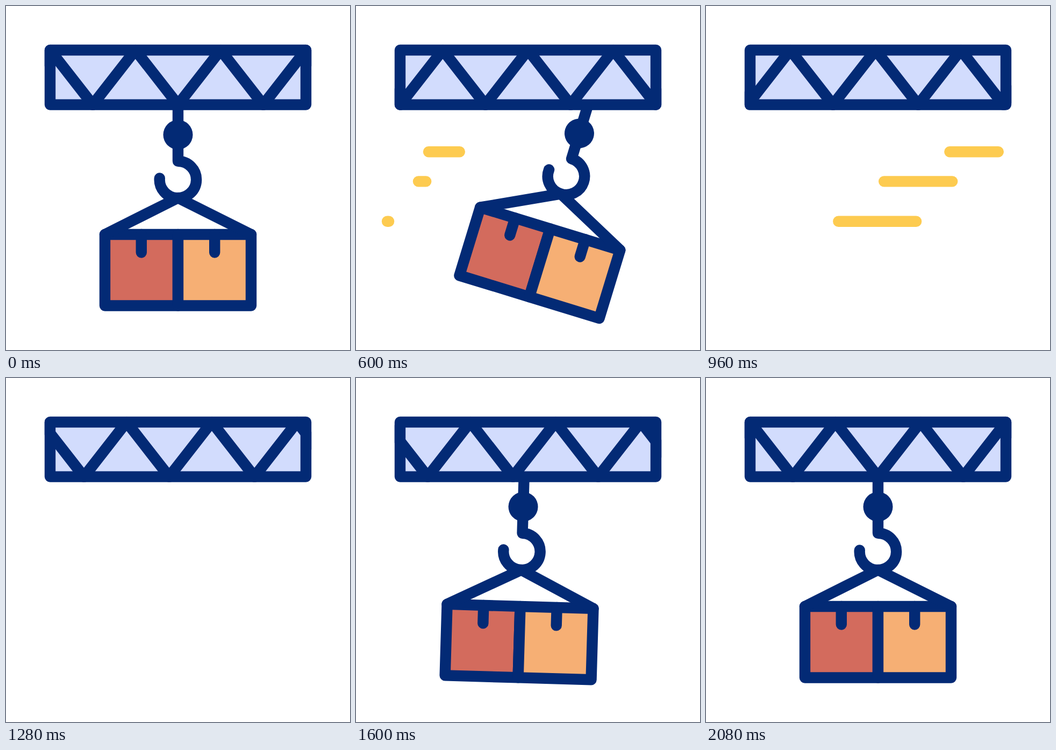
Recreate the animation shown at these times as an HTML page. Size 640x640 px, loop 3 s.

```html
<!DOCTYPE html>
<html lang="en">
<head>
<meta charset="utf-8">
<title>Crane</title>
<style>
  html, body { margin: 0; width: 100%; height: 100%; overflow: hidden; background: #fff; }
  svg { display: block; width: 100vw; height: 100vh; }
  .ink { stroke: #032a75; }
  .speed { stroke: #fdcb50; }
</style>
</head>
<body>
<svg viewBox="0 0 640 640" fill="none" stroke-width="20.4" stroke-linecap="round" stroke-linejoin="round">
  <clipPath id="beam"><rect x="71.8" y="71.8" width="496.4" height="122.4" rx="10"/></clipPath>
  <g id="lines" class="speed"></g>
  <g id="load" class="ink">
    <path d="M184 425H320V557.5H184Z" fill="#d36b5d"/>
    <path d="M320 425H456V557.5H320Z" fill="#f6af74"/>
    <path d="M251.8 425V458.5M388.2 425V458.5"/>
    <path d="M184 425L320 357L456 425"/>
    <path d="M320 183V288.8A34.2 34.2 0 1 1 285.8 320.5"/>
    <circle cx="320" cy="239.5" r="27.5" fill="#032a75" stroke="none"/>
  </g>
  <rect x="82" y="82" width="476" height="101.6" fill="#d2dcfd"/>
  <g clip-path="url(#beam)"><path id="truss" class="ink"/></g>
  <rect class="ink" x="82" y="82" width="476" height="101.6"/>
</svg>
<script>
const LOOP = 3000, STEP = 40;
const BAY = 158.6;      // width of one truss bay
const RUN = 480;        // travel of a speed line
const PIVOT = 183;
const $ = id => document.getElementById(id);
const clamp = v => Math.min(1, Math.max(0, v));

// Smooth curve through [time, value] points that never overshoots.
function curve(pts) {
  const slope = pts.slice(1).map((p, i) => (p[1] - pts[i][1]) / (p[0] - pts[i][0]));
  const tangent = pts.map((_, i) => {
    const a = slope[i - 1] || 0, b = slope[i] || 0;
    return a * b > 0 ? 2 * a * b / (a + b) : 0;
  });
  return t => {
    if (t <= pts[0][0]) return pts[0][1];
    const j = pts.findIndex(p => p[0] > t);
    if (j < 0) return pts[pts.length - 1][1];
    const [t0, v0] = pts[j - 1], [t1, v1] = pts[j];
    const d = t1 - t0, u = (t - t0) / d, w = 1 - u;
    return v0 * w * w * (1 + 2 * u) + v1 * u * u * (3 - 2 * u)
      + d * u * w * (tangent[j - 1] * w - tangent[j] * u);
  };
}

const travel = curve([[160, 0], [360, 13.5], [600, 79.3], [720, 149], [960, 392],
  [1280, 618], [1600, 765], [2080, 5 * BAY]]);
const arrive = curve([[1440, -60], [1520, -28], [1600, -7.3], [1720, 0]]);
const swingOut = curve([[160, 0], [360, 2.5], [600, 17], [720, 23.5], [820, 26]]);
const swingIn = curve([[1440, 12], [1520, 8], [1600, 1.7], [1710, -16], [1840, -8], [2000, 0]]);
const opacity = curve([[680, 1], [800, 0], [1470, 0], [1570, 1]]);

// Speed lines: y, start x, then start time and duration of head and tail.
const lines = [
  [271.3, 116, 420, 687, 488, 563],
  [326.4, 105, 496, 707, 498, 673],
  [400.7, 53, 546, 653, 531, 676]
].map(row => {
  const el = document.createElementNS('http://www.w3.org/2000/svg', 'path');
  $('lines').append(el);
  return { el, row };
});

let zigzag = '';
for (let i = -8; i <= 8; i++) {
  zigzag += (zigzag ? 'L' : 'M') + (320 + i * BAY / 2) + ' ' + (i % 2 ? 82 : 183.6);
}
$('truss').setAttribute('d', zigzag);

function drawLine({ el, row: [y, x, headAt, headFor, tailAt, tailFor] }, t) {
  const tail = RUN * clamp((t - tailAt) / tailFor) ** 2;
  const ease = (1 - Math.cos(Math.PI * clamp((t - headAt) / headFor))) / 2;
  const head = Math.max(tail, RUN * ease);
  const shown = t > headAt && tail < RUN - 2;
  el.setAttribute('d', shown ? `M${x + tail} ${y}H${x + head + 0.01}` : '');
}

function draw(t) {
  const leaving = t < 1100;
  const run = travel(t);
  const shift = leaving ? run * 1.412 : arrive(t);
  const angle = leaving ? swingOut(t) : swingIn(t);
  $('truss').setAttribute('transform', `translate(${run % BAY})`);
  $('load').setAttribute('transform', `translate(${shift}) rotate(${angle} 320 ${PIVOT})`);
  $('load').setAttribute('opacity', opacity(t));
  lines.forEach(line => drawLine(line, t));
}

const start = performance.now();
function tick() {
  const t = (performance.now() - start) % LOOP;
  draw(Math.floor(t / STEP) * STEP);
  requestAnimationFrame(tick);
}
tick();
</script>
</body>
</html>
```
